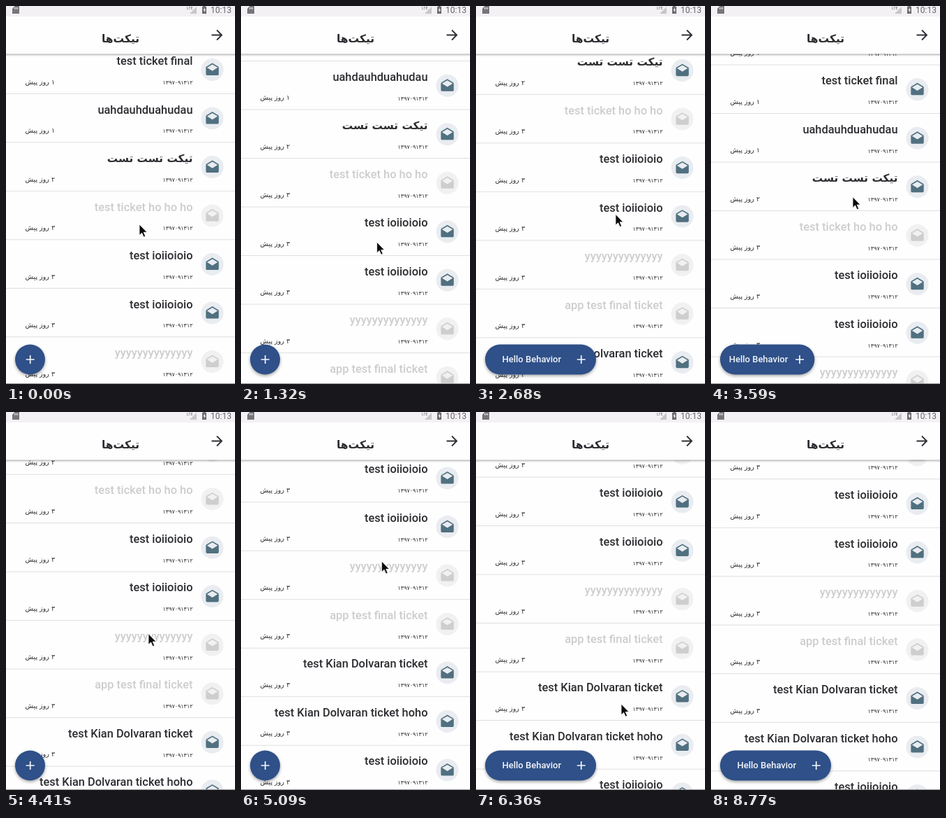
An HTML page that plays this animation: 328x540 px, repeating every 8810 ms.

```html
<!DOCTYPE html>
<html lang="fa">
<head>
<meta charset="utf-8">
<title>Tickets</title>
<style>
html, body { margin: 0; width: 100%; height: 100%; overflow: hidden; background: #fefefe; }
svg { display: block; width: 328px; height: 540px; }
text { font-family: Roboto, "DejaVu Sans", sans-serif; fill: #2c2d31; }
.title { font-size: 16.4px; font-weight: 500; text-anchor: end; }
.rtl { direction: rtl; text-anchor: start; }
.title.rtl { font: 700 15.3px "DejaVu Sans", sans-serif; }
.date { font: 8px "DejaVu Sans", sans-serif; text-anchor: end; }
.ago { font: 9.5px "DejaVu Sans", sans-serif; }
.disc { fill: #e9ecf0; }
.mail { fill: #507080; }
.dim .title { fill: #cdcdcd; }
.dim .disc { fill: #f1f1f1; }
.dim .mail { fill: #cecece; }
.rule { fill: #dfdfdf; }
.head { font: 700 15.5px "DejaVu Sans", sans-serif; text-anchor: middle; }
#fab { filter: drop-shadow(0 2px 2px rgba(0, 0, 0, .35)); }
#label { font-size: 13px; font-weight: 500; fill: #f3f6fb; text-anchor: middle; }
.bar { filter: drop-shadow(0 1px 1.5px rgba(0, 0, 0, .4)); }
</style>
</head>
<body>
<svg viewBox="0 0 328 540">
  <rect width="328" height="540" fill="#fefefe"/>
  <g id="list"></g>
  <rect y="539" width="328" height="1" fill="#929292"/>

  <rect class="bar" x="-5" width="338" height="68.5" fill="#fefefe"/>
  <text class="head" x="164" y="52">تیکت&zwnj;ها</text>
  <path d="M294.5 41.5H308M302 34.5l7 7-7 7" fill="none" stroke="#303136" stroke-width="1.9"/>

  <rect width="328" height="15" fill="#f4f1f5"/>
  <path d="M12.5 0H19V11H9V4z" fill="#77757a"/>
  <path d="M12.5 2v2.5M14.5 2v2.5M16.5 2v2.5" stroke="#f4f1f5"/>
  <text x="259" y="5" font-size="5.5" style="fill:#666">LTE</text>
  <path d="M273 1V11H263z" fill="#c9c6ca"/>
  <path d="M281 1h1.5V0h3v1H287V11h-6z" fill="#6b696e"/>
  <path d="M284.7 2.2l-2.3 4h1.5v3l2.2-4h-1.4z" fill="#f4f1f5"/>
  <text x="293" y="10.3" font-size="12" style="fill:#656368">10:13</text>

  <g id="fab">
    <rect id="pill" x="13" y="483.5" height="43" rx="21.5" fill="#2f5088"/>
  </g>
  <text id="label" y="509">Hello Behavior</text>
  <path id="plus" d="M-6 505H6M0 499V511" stroke="#f3f6fb" stroke-width="1.7"/>
  <path id="pointer" d="M0 0V15.5L3.6 12.2 6.2 18 8.7 16.9 6.2 11.3H11z" fill="#0b0b0b" stroke="#fff" stroke-width=".8"/>
</svg>
<script>
const LOOP = 8810, PITCH = 69.5;
const $ = id => document.getElementById(id);

// title, days ago, dimmed
const rows = [
  ["test ticket", "۱"],
  ["test ticket final", "۱"],
  ["uahdauhduahudau", "۱"],
  ["تیکت تست تست", "۲"],
  ["test ticket ho ho ho", "۳", true],
  ["test ioiioioio", "۳"],
  ["test ioiioioio", "۳"],
  ["yyyyyyyyyyyyyy", "۳", true],
  ["app test final ticket", "۳", true],
  ["test Kian Dolvaran ticket", "۳"],
  ["test Kian Dolvaran ticket hoho", "۳"],
  ["test ioiioioio", "۳"],
  ["test ticket oo", "۳"],
  ["test ioiioioio", "۳"]
];

const mail = "M22 8c0-.72-.38-1.35-.95-1.7L12 1 2.95 6.3C2.38 6.65 2 7.28 2 8v10c0 1.1.9 2 2 2h16c1.1 0 2-.9 2-2zM12 13L3.74 7.84 12 3l8.26 4.84z";

$("list").innerHTML = rows.map(([title, days, dim], i) => {
  const rtl = /[^ -~]/.test(title) ? "rtl" : "";
  return `<g class="${dim ? "dim" : ""}" transform="translate(0 ${55.5 + (i - 1) * PITCH})">
    <text class="title ${rtl}" x="267.5" y="28.5">${title}</text>
    <text class="date" x="267.5" y="56.3">۱۳۹۷۰۹۱۳۱۲</text>
    <text class="ago rtl" x="70" y="56">${days} روز پیش</text>
    <circle class="disc" cx="295.5" cy="35.5" r="16"/>
    <path class="mail" d="${mail}" transform="translate(284.5 25.2) scale(.92)"/>
    <rect class="rule" y="69.3" width="328" height="1"/>
  </g>`;
}).join("");

// [time, value] steps
const scroll = [[0, 0], [950, 0], [1500, -85], [1950, -232], [2200, -262], [2350, -262],
  [2900, -30], [3200, 55], [3440, 60], [3590, 28.5], [3850, -75], [4150, -102],
  [4410, -175], [5000, -265], [5590, -322], [5800, -390], [5880, -392], [6360, -241],
  [6600, -165], [6800, -160], [7150, -300], [7320, -310], [7750, -238], [LOOP, -238]];
const handY = [[0, 312], [600, 380], [950, 384], [1500, 299], [1950, 152], [2050, 140],
  [2350, 142], [2900, 380], [3200, 350], [3440, 305], [3590, 273], [3850, 170],
  [4000, 180], [4200, 388], [4410, 317], [5000, 225], [5590, 165], [5880, 266],
  [6360, 417], [6450, 430], [6800, 400], [7150, 255], [7320, 245], [7750, 317], [LOOP, 317]];
const handX = [[0, 191], [1950, 197], [3590, 203], [4410, 204], [5590, 200], [6360, 208], [LOOP, 206]];
const spread = [[0, 0], [2350, 0], [2550, 1], [3520, 1], [3590, .8], [3720, 0], [5900, 0],
  [6100, 1], [6830, 1], [7030, 0], [7340, 0], [7540, 1], [LOOP, 1]];

const slope = (a, b) => (b[1] - a[1]) / (b[0] - a[0]);

// Tangent that never overshoots: zero at turning points
function tangent(track, i) {
  if (i === 0 || i === track.length - 1) return 0;
  const a = slope(track[i - 1], track[i]), b = slope(track[i], track[i + 1]);
  return a * b > 0 ? 2 * a * b / (a + b) : 0;
}

function valueAt(track, t) {
  let i = 0;
  while (i < track.length - 2 && t >= track[i + 1][0]) i++;
  const [t0, v0] = track[i], [t1, v1] = track[i + 1];
  const d = t1 - t0, p = (t - t0) / d, q = 1 - p;
  return v0 * (1 + 2 * p) * q * q + v1 * p * p * (3 - 2 * p)
    + d * p * q * (tangent(track, i) * q - tangent(track, i + 1) * p);
}

function draw(t) {
  $("list").setAttribute("transform", `translate(0 ${valueAt(scroll, t).toFixed(2)})`);

  const open = valueAt(spread, t), width = 43 + 116 * open;
  $("pill").setAttribute("width", width);
  $("label").setAttribute("x", 13 + width / 2 - 12.7);
  $("label").setAttribute("opacity", Math.max(0, Math.min(1, (open - .4) / .4)));
  $("plus").setAttribute("transform", `translate(${13 + width - 21.3} 0)`);

  $("pointer").setAttribute("transform", `translate(${valueAt(handX, t)} ${valueAt(handY, t)})`);
  $("pointer").setAttribute("visibility", t < 8250 ? "visible" : "hidden");
}

const start = performance.now();
function tick() {
  draw((performance.now() - start) % LOOP);
  requestAnimationFrame(tick);
}
draw(0);
requestAnimationFrame(tick);
</script>
</body>
</html>
```
